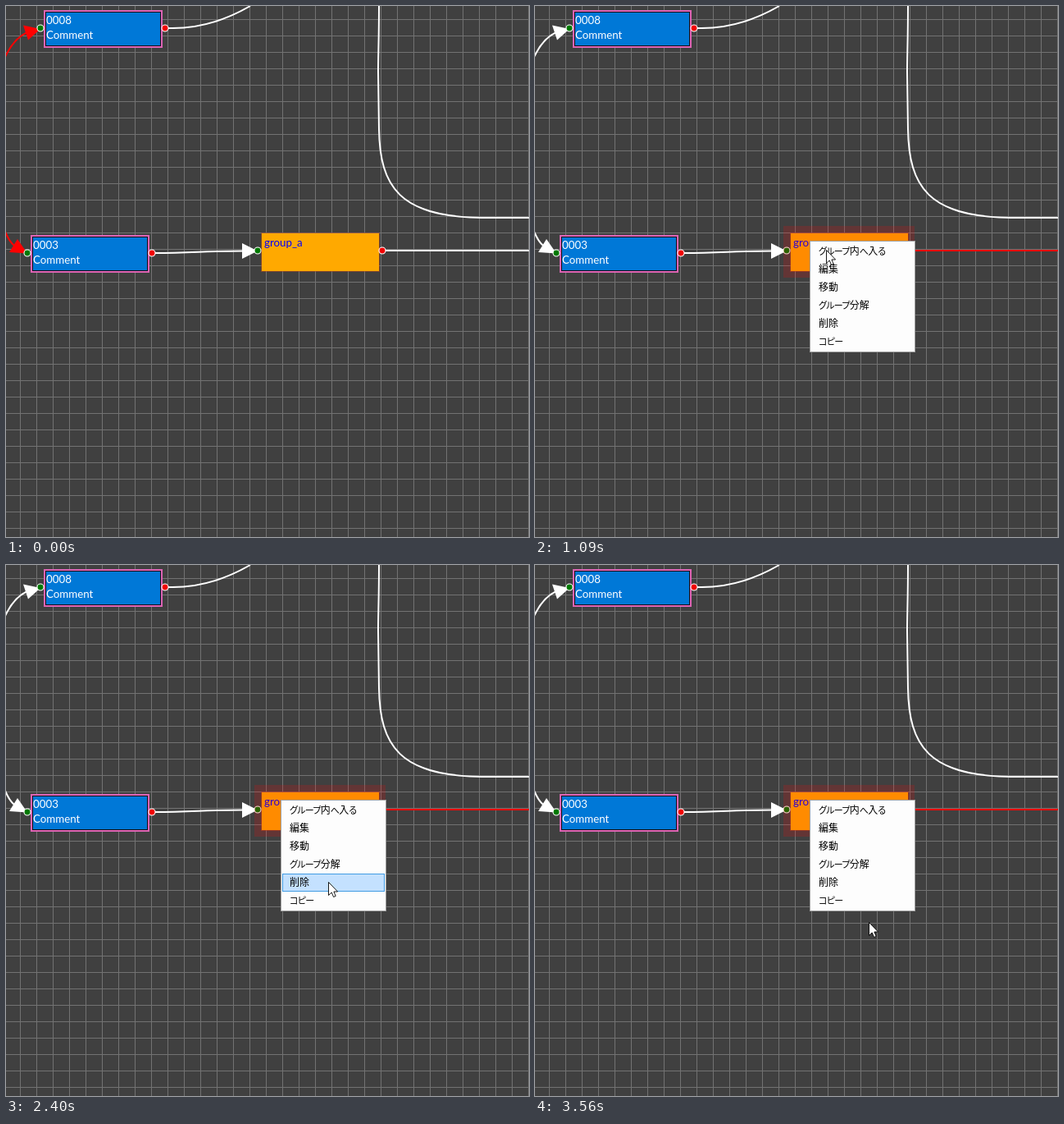
Animation, 638 px wide and 647 px high, one loop 3650 ms. Source, as an HTML page:

```html
<!DOCTYPE html>
<html lang="ja">
<head>
<meta charset="utf-8">
<title>Node editor</title>
<style>
  html, body { margin: 0; width: 100%; height: 100%; overflow: hidden; background: #404040; }
  svg { display: block; width: 638px; height: 647px; }
  .label { font: 13.3px Lato, "Open Sans", sans-serif; }
  .menu { font: 12px "Noto Sans CJK JP", "Noto Sans CJK", sans-serif; }
  .kana { font-size: 11px; letter-spacing: -.7px; font-feature-settings: "palt"; }
  .link { fill: none; stroke-width: 2; }
</style>
</head>
<body>
<svg id="stage" viewBox="0 0 638 647"></svg>
<script>
const LOOP = 3650;
const SELECT_AT = 840, MENU_AT = 1090, HOVER_AT = 1790;
const MENU = { x: 337, y: 288, w: 125, row: 22 };
const ITEMS = ['グループ内へ入る', '編集', '移動', 'グループ分解', '削除', 'コピー'];

const rect = (x, y, w, h, fill, more = '') =>
  `<rect x="${x}" y="${y}" width="${w}" height="${h}" fill="${fill}" ${more}/>`;

const label = (x, y, text, fill) =>
  `<text class="label" x="${x}" y="${y}" fill="${fill}">${text}</text>`;

const port = (x, y, fill) =>
  `<circle cx="${x}" cy="${y}" r="4" fill="${fill}" stroke="#fff" stroke-width="1.1"/>`;

const ports = (x, y) => port(x, y, '#007800') + port(x + 152, y, '#f00000');

const link = d => `<path class="link" d="${d}"/>`;
const head = points => `<polygon points="${points}" stroke="none"/>`;

function grid() {
  let d = '';
  for (let x = 17; x < 638; x += 20) d += `M${x + .5} 0V647`;
  for (let y = 16; y < 647; y += 20) d += `M0 ${y + .5}H638`;
  return `<path d="${d}" stroke="#727272" fill="none"/>`;
}

function commentNode(x, y, id) {
  return rect(x, y, 145, 46, '#dc64b4') +
    rect(x + 2, y + 2, 141, 42, '#101018') +
    rect(x + 3, y + 3, 139, 40, '#0078d7') +
    label(x + 3, y + 17, id, '#fff') +
    label(x + 3, y + 34.5, 'Comment', '#fff') +
    ports(x - 4, y + 22);
}

function menuItem(text, i) {
  const spans = text.replace(/[ぁ-ー]+/g, '<tspan class="kana">$&</tspan>');
  return `<text class="menu" x="346" y="${303 + i * MENU.row}" fill="#000">${spans}</text>`;
}

document.getElementById('stage').innerHTML = `
  ${rect(0, 0, 638, 647, '#404040')}
  ${grid()}
  <g stroke="#fff" fill="#fff">
    ${link('M198 27C230 28 265 19 298 0')}
    ${link('M455 0C455 40 454 60 454 80L455 150C456 220 480 257 580 258H638')}
    ${link('M182 301C225 301 245 298.5 290 298.5')}
    ${head('288,289 288,308 307,298.5')}
  </g>
  <g id="inLinks">
    ${link('M-1 62C6 47 15 37 26 32')}
    ${head('21,23.5 27,41.5 42,28')}
    ${link('M-1 275Q4 287 10 292')}
    ${head('14,284 4,300 26,301.5')}
  </g>
  <g id="outLink">${link('M463 298H638')}</g>
  ${commentNode(46, 5, '0008')}
  ${commentNode(30, 279, '0003')}
  ${rect(312, 277, 143, 46, '#ffa900')}
  ${rect(311.5, 276.5, 144, 47, 'none', 'stroke="#b5481f" stroke-opacity=".5"')}
  ${label(315, 293, 'group_a', '#0000ff')}
  ${ports(307, 298)}
  ${rect(303, 268, 160, 63, '#f00', 'id="glow" opacity=".18"')}
  <g id="menu">
    ${rect(335.5, 286.5, 128, 135, '#fdfdfd', 'stroke="#a0a0a0"')}
    ${rect(MENU.x + .5, 0, MENU.w - 1, MENU.row - 1, '#c4e1ff', 'id="hover" stroke="#429ce3"')}
    ${ITEMS.map(menuItem).join('')}
  </g>
  <path id="cursor" d="M.5 .5V16.5L4.2 13L6.6 18.5L9.2 17.4L6.9 12H11.6Z"
        fill="#fff" stroke="#000" stroke-width=".9"/>`;

const part = Object.fromEntries(
  ['inLinks', 'outLink', 'glow', 'menu', 'hover', 'cursor']
    .map(id => [id, document.getElementById(id)]));

// Each sweep jumps through its sample times; the last sample lands on "to".
const SWEEPS = [
  { times: [70, 150, 230, 300, 380, 460, 540], from: [532, 550], to: [356, 298], first: 0, power: 1.5 },
  { times: [620], to: [355, 297] },
  { times: [1790], to: [356, 297] },
  { times: [1940, 2020, 2100, 2190], to: [374, 339] },
  { times: [2250, 2330, 2400], to: [393, 386] },
  { times: [2490, 2560, 2640], to: [402, 414] },
  { times: [3410, 3490, 3560], to: [407, 435] }
];

function cursorAt(t) {
  let pos = null;
  for (const { times, from, to, first = 1, power = 1 } of SWEEPS) {
    const passed = times.filter(s => s <= t).length;
    if (!passed) break;
    const p = (passed - 1 + first) / (times.length - 1 + first);
    const k = 1 - (1 - p) ** power;
    const start = from || pos;
    pos = start.map((v, i) => Math.round(v + (to[i] - v) * k));
  }
  return pos;
}

const show = (el, on) => el.setAttribute('visibility', on ? 'visible' : 'hidden');

function paint(el, color) {
  el.setAttribute('stroke', color);
  el.setAttribute('fill', color);
}

function draw(t) {
  const selected = t >= SELECT_AT;
  paint(part.inLinks, selected ? '#fff' : '#f00');
  paint(part.outLink, selected ? '#f00' : '#fff');
  show(part.glow, selected);
  show(part.menu, t >= MENU_AT);

  const pos = cursorAt(t);
  show(part.cursor, pos);
  if (pos) part.cursor.setAttribute('transform', `translate(${pos})`);

  const row = pos ? Math.floor((pos[1] - MENU.y) / MENU.row) : -1;
  const hovering = t >= HOVER_AT && row >= 0 && row < ITEMS.length;
  show(part.hover, hovering);
  if (hovering) part.hover.setAttribute('y', MENU.y + row * MENU.row + .5);
}

const began = performance.now();
function tick() {
  draw((performance.now() - began) % LOOP);
  requestAnimationFrame(tick);
}
tick();
</script>
</body>
</html>
```
